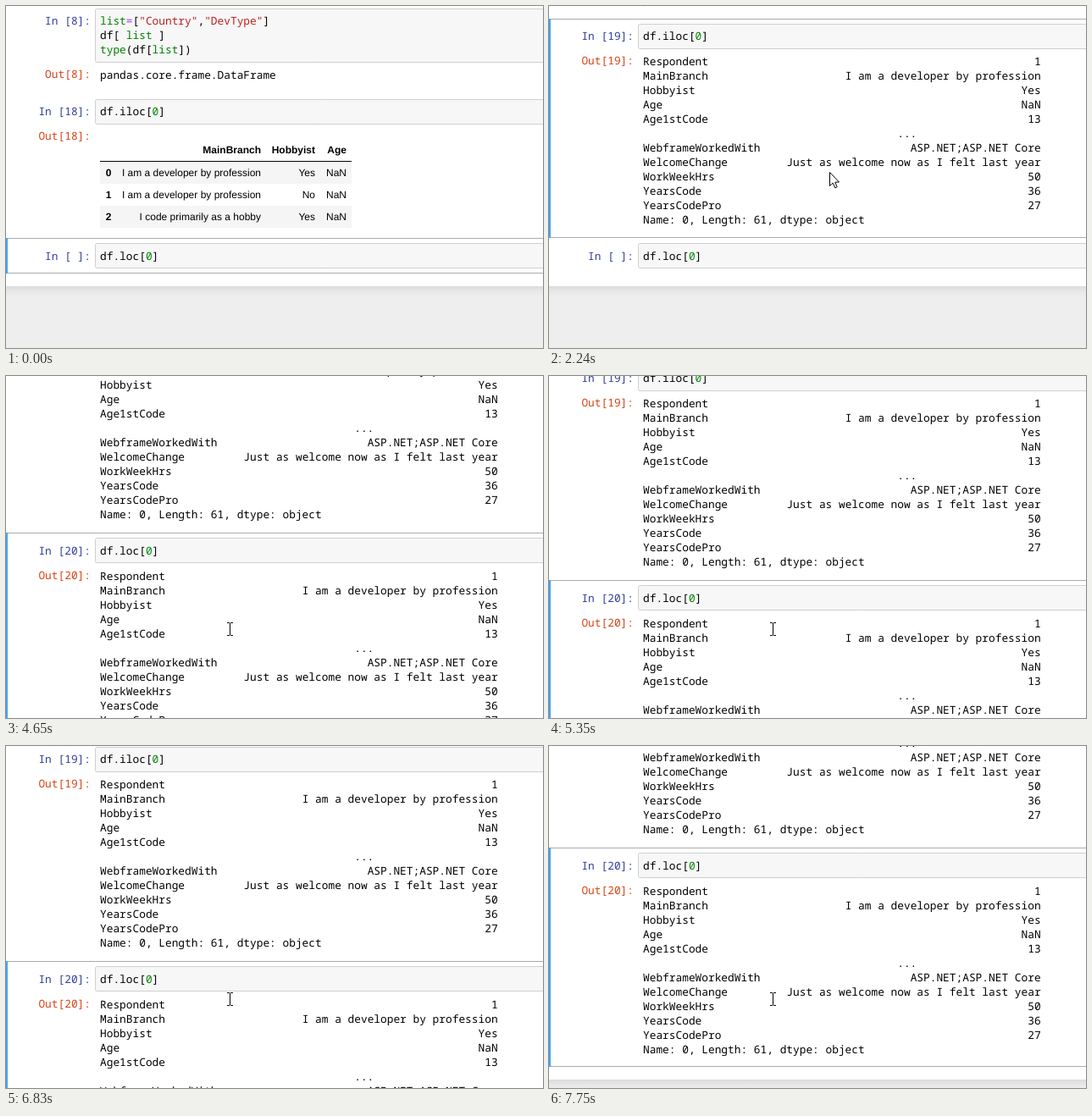
An HTML page with a canvas for the animation above (8 s loop, 634 by 404 pixels).

```html
<!DOCTYPE html>
<html lang="en">
<head>
<meta charset="utf-8">
<title>Notebook: iloc and loc</title>
<style>
  html, body { margin: 0; width: 100%; height: 100%; overflow: hidden; background: #fff; }
  canvas { display: block; }
</style>
</head>
<body>
<canvas id="stage" width="634" height="404"></canvas>
<script>
const W = 634, H = 404, LOOP = 8000;
const ctx = document.getElementById('stage').getContext('2d', { alpha: false });
const MONO = '12.83px "Noto Sans Mono", "DejaVu Sans Mono", monospace';
const SANS = '12px "Liberation Sans", Arial, sans-serif';
const CHAR = 7.698, LINE = 17, CODE_X = 111;
// Layout is fractional; text and boxes snap to whole pixels when drawn
const EMPTY_H = 42, TABLE_H = 170.4, SERIES_H = 259.6;
const IN_BASE = 25.4, PROMPT_BASE = 54.4, OUT_BASE = 55.4;
const BLACK = '#000', GREEN = '#008000', RED = '#ba2121', MATCH = '#00bb00';

const series = [
  ['Respondent', '1'],
  ['MainBranch', 'I am a developer by profession'],
  ['Hobbyist', 'Yes'],
  ['Age', 'NaN'],
  ['Age1stCode', '13'],
  null,
  ['WebframeWorkedWith', 'ASP.NET;ASP.NET Core'],
  ['WelcomeChange', 'Just as welcome now as I felt last year'],
  ['WorkWeekHrs', '50'],
  ['YearsCode', '36'],
  ['YearsCodePro', '27']
];
const people = [
  ['I am a developer by profession', 'Yes'],
  ['I am a developer by profession', 'No'],
  ['I code primarily as a hobby', 'Yes']
];

// Scrolls of the page: start, end, steps, top of the iloc cell before and after
const scrolls = [
  [1780, 2240, 7, 231.6, 14.6],
  [4400, 4650, 4, 14.6, -74.4],
  [4870, 5350, 7, -74.4, -18.4],
  [6280, 6510, 4, -18.4, -2.4],
  [6830, 7600, 11, -2.4, -131.4],
  [7660, 7750, 2, -131.4, -139.4]
];

const ease = p => p * p * (3 - 2 * p);
const mix = (a, b, p) => a + (b - a) * p;

// Progress in n equal jumps, the first at a and the last at b
function stepped(t, a, b, n) {
  if (t < a) return 0;
  if (t >= b) return 1;
  return (Math.floor((t - a) / (b - a) * (n - 1) + 1e-6) + 1) / n;
}

function rect(x, y, w, h, color) {
  ctx.fillStyle = color;
  ctx.fillRect(x, y, w, h);
}

function text(s, x, y, color = BLACK, font = MONO, align = 'left') {
  ctx.font = font;
  ctx.textRendering = 'geometricPrecision';
  ctx.textAlign = align;
  ctx.fillStyle = color;
  ctx.fillText(s, x, Math.round(y));
}

function codeLine(parts, y) {
  let col = 0;
  for (const [s, color] of parts) {
    text(s, CODE_X + col * CHAR, y, color);
    col += s.length;
  }
}

function input(y, label, lines) {
  const h = 30 + (lines.length - 1) * LINE;
  ctx.beginPath();
  ctx.roundRect(105.5, Math.round(y) + 6.5, W, h - 1, 2);
  ctx.fillStyle = '#f7f7f7';
  ctx.fill();
  ctx.strokeStyle = '#cfcfcf';
  ctx.lineWidth = 1;
  ctx.stroke();
  text(`In [${label}]:`, 100, y + IN_BASE, '#303f9f', MONO, 'right');
  lines.forEach((parts, i) => codeLine(parts, y + IN_BASE + i * LINE));
}

function outPrompt(y, n) {
  text(`Out[${n}]:`, 100, y + PROMPT_BASE, '#d84315', MONO, 'right');
}

function indexer(y, label, name, editing) {
  const bracket = editing ? MATCH : BLACK;
  input(y, label, [[['df.' + name, BLACK], ['[', bracket], ['0', '#008800'], [']', bracket]]]);
  if (editing) rect(Math.round(CODE_X + (name.length + 6) * CHAR), Math.round(y) + 13, 1, LINE, BLACK);
}

function seriesOutput(y, n) {
  outPrompt(y, n);
  series.forEach((row, i) => {
    const base = y + OUT_BASE + i * LINE;
    if (!row) return text('...', CODE_X + 39 * CHAR, base);
    text(row[0], CODE_X, base);
    text(row[1], CODE_X + 61 * CHAR, base, BLACK, MONO, 'right');
  });
  text('Name: 0, Length: 61, dtype: object', CODE_X, y + OUT_BASE + series.length * LINE);
}

function tableOutput(y) {
  const cell = (s, x, base, bold) => text(s, x, base, BLACK, (bold ? 'bold ' : '') + SANS, 'right');
  outPrompt(y, 18);
  const head = Math.round(y) + 70;
  cell('MainBranch', 301, head, true);
  cell('Hobbyist', 365, head, true);
  cell('Age', 402, head, true);
  rect(111, head + 9, 297, 1, BLACK);
  people.forEach(([branch, hobby], i) => {
    const top = head + 10 + i * 26, base = top + 17;
    if (i % 2 === 0) rect(111, top, 297, 26, '#f5f5f5');
    cell(i, 124.5, base, true);
    cell(branch, 301, base);
    cell(hobby, 365, base);
    cell('NaN', 402, base);
  });
}

function selection(y, h, editing) {
  const line = editing ? '#66bb6a' : '#ababab';
  const top = Math.round(y), bottom = Math.floor(y + h);
  rect(0, top, W, 1, line);
  rect(0, bottom - 1, W, 1, line);
  rect(0, top, 2, bottom - top, editing ? '#66bb6a' : '#42a5f5');
}

function footer(y) {
  if (y >= H) return;
  rect(0, y, W, H - y, '#eeeeee');
  const shade = ctx.createLinearGradient(0, y, 0, y + 13);
  shade.addColorStop(0, 'rgba(87,87,87,.12)');
  shade.addColorStop(0.5, 'rgba(87,87,87,.04)');
  shade.addColorStop(1, 'rgba(87,87,87,0)');
  rect(0, y, W, 13, shade);
}

function arrow(x, y) {
  const points = [[0, 0], [0, 16], [3.7, 12.6], [6.3, 18.4], [8.7, 17.3], [6.2, 11.7], [11, 11.5]];
  ctx.beginPath();
  points.forEach(([dx, dy]) => ctx.lineTo(x + dx + 0.5, y + dy + 0.5));
  ctx.closePath();
  ctx.fillStyle = '#fff';
  ctx.fill();
  ctx.strokeStyle = BLACK;
  ctx.lineWidth = 1;
  ctx.stroke();
}

function beam(x, y) {
  for (const dy of [-8, 7]) {
    rect(x - 3, y + dy, 3, 1, BLACK);
    rect(x + 1, y + dy, 3, 1, BLACK);
  }
  rect(x, y - 7, 1, 14, BLACK);
}

function halo(x, y) {
  ctx.beginPath();
  ctx.arc(x, y, 12, 0, Math.PI * 2);
  ctx.fillStyle = 'rgba(255,255,0,.47)';
  ctx.fill();
}

function pointer(t) {
  if (t < 150) return;
  if (t >= 680 && t < 930) halo(321, 135);
  if (t >= 3240 && t < 3470) halo(262, 298);

  if (t < 450) {
    const p = stepped(t, 150, 450, 5);
    if (p < 0.7) {
      const q = (p - 0.2) / 0.6;
      arrow(Math.round(mix(491, 332, q)), Math.round(mix(249, 118, q)));
    } else beam(324, 123);
  } else if (t < 1780) {
    beam(323, 136);
  } else if (t < 2700) {
    const p = ease(stepped(t, 1780, 2240, 7));
    arrow(Math.round(mix(321, 331, p)), Math.round(mix(135, 196, p)));
  } else {
    const p = ease(stepped(t, 2700, 3010, 5));
    const x = Math.round(mix(331, 262, p)), y = Math.round(mix(196, 298, p));
    if (y < 280) arrow(x, y);
    else beam(x + 2, y + 1);
  }
}

function pageTop(t) {
  let y = t < 1260 ? 103.8 : 231.6;
  for (const [a, b, n, from, to] of scrolls) {
    if (t >= a) y = from + Math.round((to - from) * ease(stepped(t, a, b, n)));
  }
  return y;
}

function draw(t) {
  const y = pageTop(t);
  const ilocH = t < 1260 ? TABLE_H : t < 1310 ? EMPTY_H : SERIES_H;
  const locY = y + ilocH, locH = t < 3790 ? EMPTY_H : SERIES_H;
  const onIloc = t >= 680 && t < 3240;
  const editIloc = t >= 680 && t < 1260, editLoc = t >= 3240 && t < 3790;

  rect(0, 0, W, H, '#fff');

  const first = y - 107;
  input(first, 8, [
    [['list', GREEN], ['=', '#aa22ff'], ['[', BLACK], ['"Country"', RED], [',', BLACK], ['"DevType"', RED], [']', BLACK]],
    [['df[ ', BLACK], ['list', GREEN], [' ]', BLACK]],
    [['type', GREEN], ['(df[', BLACK], ['list', GREEN], ['])', BLACK]]
  ]);
  outPrompt(first + 34, 8);
  text('pandas.core.frame.DataFrame', CODE_X, first + 34 + OUT_BASE);

  if (onIloc) selection(y, ilocH, editIloc);
  else selection(locY, locH, editLoc);

  indexer(y, t < 1260 ? 18 : t < 1310 ? '*' : 19, 'iloc', editIloc);
  if (t < 1260) tableOutput(y);
  else if (t >= 1310) seriesOutput(y, 19);

  indexer(locY, t < 3790 ? ' ' : 20, 'loc', editLoc);
  if (t >= 3790) seriesOutput(locY, 20);

  footer(Math.floor(locY + locH) + 15);
  pointer(t);
}

const start = performance.now();
function tick() {
  draw((performance.now() - start) % LOOP);
  requestAnimationFrame(tick);
}
tick();
</script>
</body>
</html>
```
